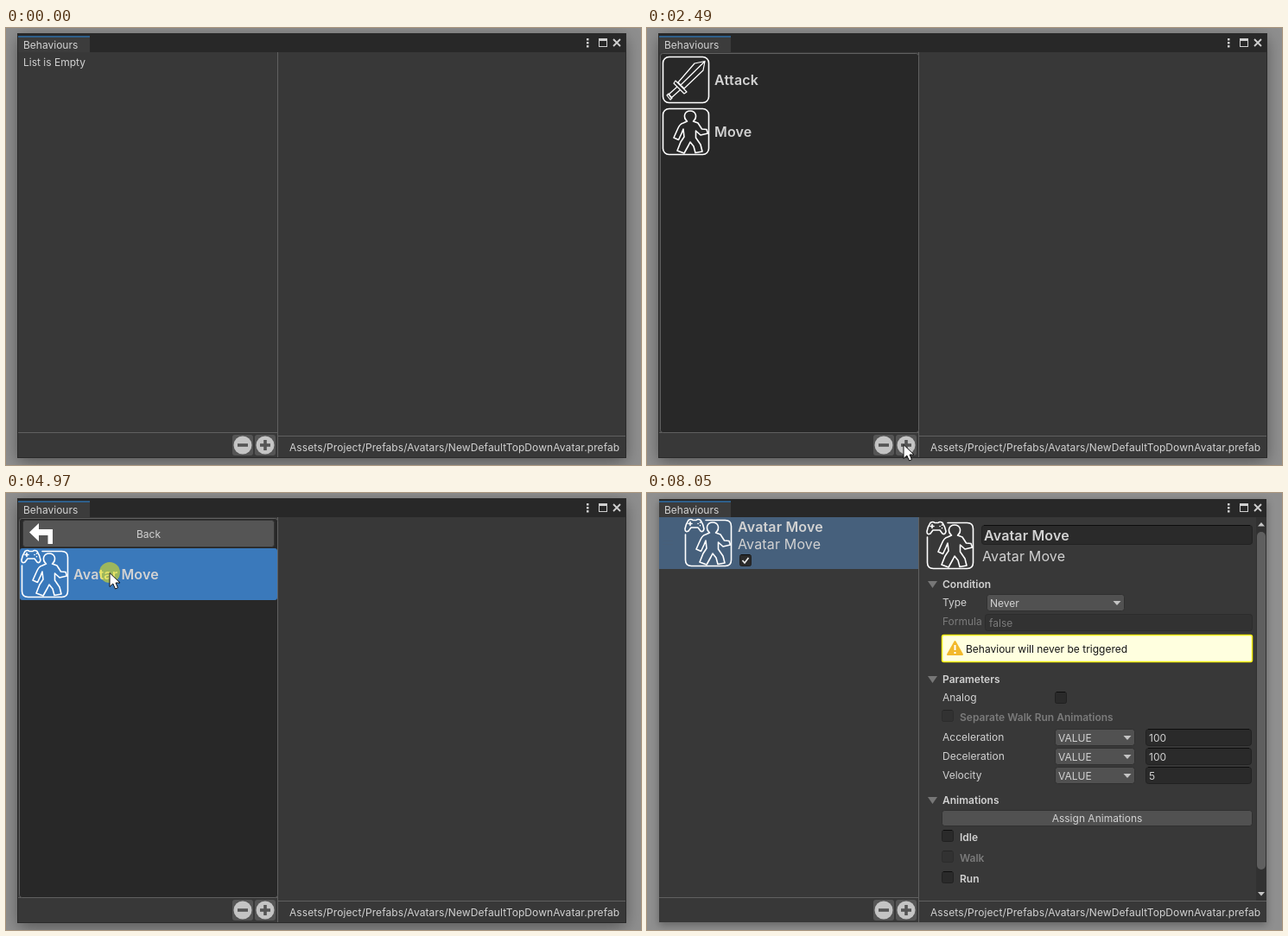
These frames come from a looping animation (735x506 px, 8.12 s). An HTML page:

```html
<!DOCTYPE html>
<html lang="en">
<head>
<meta charset="utf-8">
<title>Behaviours</title>
<style>
html, body { margin: 0; width: 100%; height: 100%; overflow: hidden; background: #8f8f8f; }
body { position: relative; }
.window { position: absolute; left: 14px; top: 7px; width: 703px; height: 490px; background: #383838; }
.focused { box-shadow: 0 0 0 1px #2a2a2a, 0 5px 18px rgba(0,0,0,.42); animation: focused 8120ms step-end infinite; }
.blurred { box-shadow: 0 3px 9px rgba(0,0,0,.32); animation: blurred 8120ms step-end infinite; }
svg { position: absolute; left: 0; top: 0; width: 735px; height: 506px; display: block; }
text { font: 12px Inter, sans-serif; fill: #d2d2d2; white-space: pre; }
.b { font-weight: 600; }
.big { font-size: 16px; letter-spacing: .01em; }
.file { letter-spacing: .0075em; }
.dim { fill: #7b7b7b; }
.line { fill: none; stroke: #fff; stroke-width: 1.6; stroke-linejoin: round; stroke-linecap: round; }
.thin { stroke-width: 1.2; }
.field { fill: #2a2a2a; stroke: #212121; color: #0d0d0d; }
.off { fill: #323232; stroke: #2c2c2c; color: #252525; }
.edge { stroke: currentColor; }
.btn { fill: #515151; stroke: #303030; }
.fold { fill: #777; }

/* Scenes and states, all on one 8120 ms clock */
.empty, .root, .sub, .done, .hover, .press, .pointer, .glow { animation: 8120ms step-end infinite; }
.empty { animation-name: empty; }
.root { animation-name: root; }
.sub { animation-name: sub; }
.done { animation-name: done; }
.hover { animation-name: hover; }
.press { animation-name: press; }
.pointer { animation-name: pointer; }
.glow { animation-name: glow; }
.path { animation: path 8120ms linear infinite; }

@keyframes focused { 0% { opacity: 1 } 99.138%, 100% { opacity: 0 } }
@keyframes blurred { 0% { opacity: 0 } 99.138%, 100% { opacity: 1 } }
@keyframes empty { 0% { opacity: 1 } 27.833%, 100% { opacity: 0 } }
@keyframes root { 0% { opacity: 0 } 27.833% { opacity: 1 } 45.443%, 100% { opacity: 0 } }
@keyframes sub { 0% { opacity: 0 } 45.443% { opacity: 1 } 62.069%, 100% { opacity: 0 } }
@keyframes done { 0% { opacity: 0 } 62.069%, 100% { opacity: 1 } }
@keyframes hover { 0% { opacity: 0 } 37.1%, 100% { opacity: 1 } }
@keyframes glow { 0% { opacity: 0 } 92.6% { opacity: 1 } 93%, 100% { opacity: 0 } }
@keyframes pointer { 0% { opacity: 0 } 7.882% { opacity: 1 } 95.443%, 100% { opacity: 0 } }
@keyframes press {
  0% { opacity: 0 } 26.97% { opacity: 1 } 27.833% { opacity: 0 }
  44.212% { opacity: 1 } 45.443% { opacity: 0 }
  61.207% { opacity: 1 } 62.069% { opacity: 0 }
  81.65% { opacity: 1 } 88%, 100% { opacity: 0 }
}
@keyframes path {
  0%, 7.882% { transform: translate(697px, 336px); animation-timing-function: cubic-bezier(.4,.1,.7,.85) }
  13.793% { transform: translate(291px, 172px); animation-timing-function: ease-out }
  15.9% { transform: translate(234px, 133px); animation-timing-function: ease-in }
  17.61% { transform: translate(243px, 186px); animation-timing-function: cubic-bezier(.2,.5,.5,1) }
  24.63%, 30.665% { transform: translate(297px, 482px); animation-timing-function: ease-in-out }
  39.655%, 48.768% { transform: translate(113px, 118px); animation-timing-function: ease-in-out }
  51.232%, 67.857% { transform: translate(120px, 92px); animation-timing-function: cubic-bezier(.45,.1,.7,.9) }
  73.153% { transform: translate(271px, 126px); animation-timing-function: ease-out }
  78.818%, 81.65% { transform: translate(315px, 127px); animation-timing-function: ease-in }
  82.882% { transform: translate(300px, 127px); animation-timing-function: ease-out }
  85.5% { transform: translate(246px, 128px); animation-timing-function: ease-in-out }
  88%, 88.7% { transform: translate(315px, 135px); animation-timing-function: ease-in }
  91.502% { transform: translate(390px, 314px); animation-timing-function: linear }
  95.443%, 100% { transform: translate(490px, 508px) }
}
</style>
</head>
<body>
<div class="window focused"></div>
<div class="window blurred"></div>
<div class="window"></div>
<svg viewBox="0 0 735 506">
  <defs>
    <path id="man" class="line" d="M28.500 15C23 10 25.500 3 32 3S41 10 35.500 15L41 17 45.500 24 51 24.500 52.500 29 44 31 38.500 26V34L44 42 46 50 38 51.500 36 44 32 39 30 43 25 52 17 49 21 39 25 33 24 24 22 29 18.500 36.500 13 34 17 25Q20 17.500 24 17Z"/>
    <rect id="frame" class="line" x=".5" y=".5" width="53" height="53" rx="7"/>
    <g id="avatar">
      <path class="line" d="M24 .5H46.500Q53.500 .5 53.500 7.500V46.500Q53.500 53.500 46.500 53.500H7.500Q.5 53.500 .5 46.500V17"/>
      <use href="#man"/>
      <path class="line" d="M4 .5Q7 -1.500 9 .5H13Q15 -1.500 18 .5Q21 5 22 10.500 21 15 18 13L15 9H7L4 13Q0 15 0 10.500 1 5 4 .5ZM4 4.500H8M6 2.500V6.500M15 4.500H15.200M17.500 3V3.200M17.500 6.500V6.700"/>
    </g>
    <path id="sword" class="line thin" d="M49 5.500 47 16 25 37 18 30 37 8ZM49 5.500 21 33M15 28 28 41 25 43 13 31ZM17 35 7 44 10 48 20 39M5 45 9 50 11 48 7 43Z"/>
    <path id="arrow" d="M0 0H9L4.500 5Z" fill="#c4c4c4"/>
    <path id="fold" class="fold" d="M325 0H336L330.500 8Z"/>
    <g id="box">
      <rect x=".5" y=".5" width="13" height="13" rx="2"/>
      <path class="edge" d="M2 .5H12"/>
    </g>
    <g id="param">
      <rect class="btn" x="472.500" y="273.500" width="92" height="19" rx="3"/>
      <text x="476" y="288">VALUE</text>
      <use href="#arrow" x="551.500" y="281"/>
      <g class="field">
        <rect x="577.500" y="273.500" width="122" height="19" rx="3"/>
        <path class="edge" d="M580 273.500H697"/>
      </g>
    </g>
    <g id="round">
      <rect x="-12" y="-12" width="24" height="24" rx="3" fill="#555"/>
      <circle r="10.500" fill="#c4c4c4"/>
      <path d="M-6 0H6" stroke="#555" stroke-width="3.600"/>
    </g>
  </defs>

  <!-- Window chrome -->
  <path d="M14 7H717V28H14Z" fill="#282828"/>
  <path d="M14 10H97V28H14Z" fill="#3c3c3c"/>
  <path d="M14 9H97V11H14Z" fill="#2f5f8a"/>
  <text x="20" y="24">Behaviours</text>
  <g fill="#d0d0d0">
    <path d="M672 12h2.500v2.500h-2.500zM672 16h2.500v2.500h-2.500zM672 20h2.500v2.500h-2.500z"/>
    <path d="M686 12H696V22H686ZM687 15V21H695V15Z" fill-rule="evenodd"/>
    <path d="M703 13 711 21M711 13 703 21" stroke="#d0d0d0" stroke-width="1.800"/>
  </g>
  <path d="M14 468.500H314M314.500 28V497M315 472.500H717" stroke="#606060" fill="none"/>
  <use href="#round" x="274" y="483"/>
  <use href="#round" x="300" y="483"/>
  <path d="M300 477V489" stroke="#555" stroke-width="3.600"/>
  <text class="file" x="328" y="489.500">Assets/Project/Prefabs/Avatars/NewDefaultTopDownAvatar.prefab</text>

  <text class="empty" x="20" y="43.500">List is Empty</text>

  <g class="root">
    <rect x="15.500" y="29.500" width="299" height="439" rx="3" fill="#282828" stroke="#606060"/>
    <rect class="hover" x="16" y="90" width="298" height="60" rx="3" fill="#3a79bb"/>
    <use href="#frame" x="18" y="33"/><use href="#sword" x="18" y="33"/>
    <text class="b big" x="78" y="66">Attack</text>
    <use href="#frame" x="18" y="93"/><use href="#man" x="18" y="93"/>
    <text class="b big" x="78" y="126">Move</text>
  </g>

  <g class="sub">
    <rect x="15.500" y="29.500" width="299" height="439" rx="3" fill="#282828" stroke="#606060"/>
    <rect x="19.500" y="31.500" width="291" height="31" rx="3" fill="#555" stroke="#333"/>
    <path d="M27 45.500 38 35V42H54V59H48.500V49H38V56Z" fill="#fff"/>
    <text x="165" y="51.500" text-anchor="middle">Back</text>
    <rect x="16" y="64" width="298" height="60" rx="3" fill="#3a79bb"/>
    <use href="#avatar" x="18" y="67"/>
    <text class="b big" x="78" y="100">Avatar Move</text>
  </g>

  <g class="done">
    <path d="M14 28H314V88H14Z" fill="#46607c"/>
    <path d="M18 55.500H30M18 59.500H30" stroke="#485f78"/>
    <use href="#avatar" x="44" y="31"/>
    <text class="b big" x="105" y="45">Avatar Move</text>
    <text class="big" x="105" y="65">Avatar Move</text>
    <use href="#box" class="field" x="107" y="71"/>
    <path d="M110.500 78 113 81 117.500 75" fill="none" stroke="#eee" stroke-width="1.700"/>

    <use href="#avatar" x="324" y="34"/>
    <g class="field">
      <rect x="387.500" y="37.500" width="313" height="22" rx="3"/>
      <path class="edge" d="M390 37.500H698"/>
    </g>
    <text class="b big" x="390" y="55">Avatar Move</text>
    <text class="big" x="388" y="79">Avatar Move</text>

    <use href="#fold" y="102"/>
    <text class="b" x="342" y="110">Condition</text>
    <text x="342" y="131">Type</text>
    <rect class="btn" x="393.500" y="117.500" width="159" height="19" rx="3"/>
    <text x="397" y="132">Never</text>
    <use href="#arrow" x="539.500" y="125"/>
    <text class="dim" x="342" y="153">Formula</text>
    <rect class="off" x="391.500" y="140.500" width="309" height="19" rx="3"/>
    <text class="dim" x="396" y="155">false</text>
    <rect x="341.500" y="164.500" width="359" height="31" rx="2" fill="#ffffdf" stroke="#f7ee10" stroke-width="1.500"/>
    <path d="M356.500 172 365 187H348Z" fill="#f2b92c" stroke="#f2b92c" stroke-width="2" stroke-linejoin="round"/>
    <path d="M356.500 176V182M356.500 184V186" stroke="#fff" stroke-width="2"/>
    <text x="369" y="184.500" style="fill:#151515">Behaviour will never be triggered</text>

    <use href="#fold" y="212"/>
    <text class="b" x="342" y="220">Parameters</text>
    <text x="342" y="241">Analog</text>
    <use href="#box" class="field" x="472" y="230"/>
    <use href="#box" class="off" x="341" y="251"/>
    <text class="b dim" x="362" y="264">Separate Walk Run Animations</text>
    <use href="#param"/><use href="#param" y="22"/><use href="#param" y="44"/>
    <text x="342" y="287">Acceleration</text><text x="581" y="288">100</text>
    <text x="342" y="309">Deceleration</text><text x="581" y="310">100</text>
    <text x="342" y="331">Velocity</text><text x="581" y="332">5</text>

    <use href="#fold" y="352"/>
    <text class="b" x="342" y="360">Animations</text>
    <rect class="btn" x="341.500" y="367.500" width="359" height="18" rx="3"/>
    <rect class="glow" x="342" y="368" width="358" height="17" rx="3" fill="#676767"/>
    <text x="521" y="381" text-anchor="middle">Assign Animations</text>
    <use href="#box" class="field" x="341" y="390"/>
    <text class="b" x="362" y="403">Idle</text>
    <use href="#box" class="off" x="341" y="414"/>
    <text class="b dim" x="362" y="427">Walk</text>
    <use href="#box" class="field" x="341" y="438"/>
    <text class="b" x="362" y="451">Run</text>

    <path d="M705 28H717V472H705Z" fill="#313131"/>
    <rect x="706" y="45" width="10" height="391" rx="5" fill="#5f5f5f"/>
    <path d="M707 38.500H715L711 34ZM707 462H715L711 466.500Z" fill="#c4c4c4"/>
  </g>

  <g class="pointer">
    <g class="path">
      <circle class="press" r="12" fill="#fff500" fill-opacity=".5"/>
      <path d="M0 .5V16.500L3.800 13 6.500 19 9.500 17.700 7 12H12Z" fill="#fff" stroke="#111" stroke-width="1"/>
    </g>
  </g>
</svg>
</body>
</html>
```
